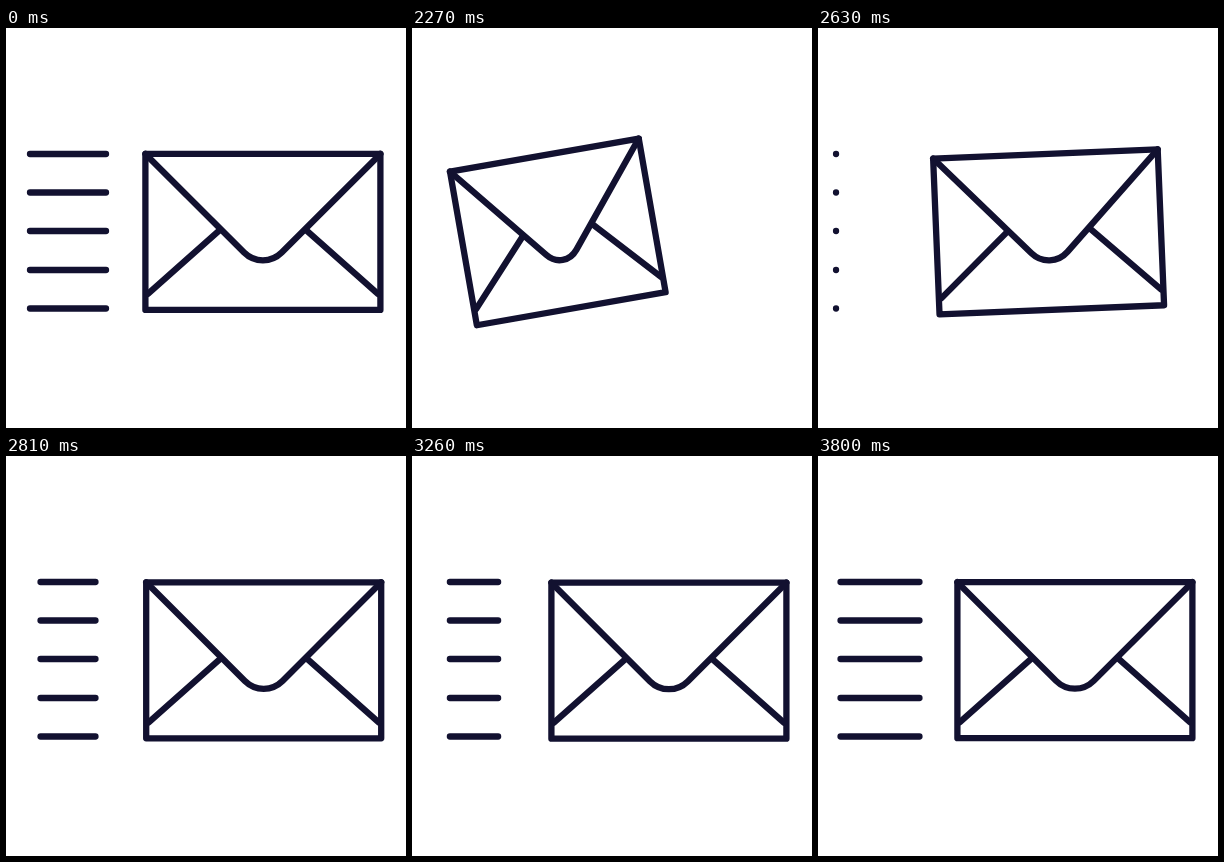
An HTML page for the animation above (3.83 s loop, 400x400 px).

```html
<!DOCTYPE html>
<html lang="en">
<head>
<meta charset="utf-8">
<title>Sending mail</title>
<style>
  html, body { margin: 0; width: 100%; height: 100%; overflow: hidden; background: #fff; }
  svg { display: block; width: 100%; height: 100%; }
  path {
    fill: none; stroke: #121130; stroke-width: 6.3;
    stroke-linecap: round; stroke-linejoin: round;
    vector-effect: non-scaling-stroke;
  }
</style>
</head>
<body>
<svg viewBox="0 0 400 400">
  <path id="trails"/>
  <g id="envelope">
    <path d="M-117.5 -78H117.5V78H-117.5Z"/>
    <path d="M-117.5 -78L-18.8 20.7A26.6 26.6 0 0 0 18.8 20.7L117.5 -78"/>
    <path d="M-43.5 -1.5L-115 62M43.5 -1.5L115 62"/>
  </g>
</svg>
<script>
  const LOOP = 3830, START = 2030, STEP = 30;
  const ROWS = [126, 164.5, 203, 242, 280.5];
  const trails = document.getElementById('trails');
  const envelope = document.getElementById('envelope');

  const clamp = v => Math.min(1, Math.max(0, v));
  const wave = (t, peak, period) => Math.cos(2 * Math.PI * (t - peak) / period);

  // How far the envelope is pulled back: 0 at rest, 1 fully wound up.
  function pull(t) {
    if (t < START) return 0;
    if (t < 2510) return 1 - 0.585 ** ((t - 2000) / STEP);
    return (1 + Math.cos(Math.PI * clamp((t - 2510) / 177))) / 2;
  }

  // Left and right end of the speed lines, or null while they are gone.
  function span(t, p) {
    if (t < 2270) return [24, 24 + 76 * (1 - p)];
    if (t < 2600) return null;
    const left = 26 + 12 * wave(t, 3263, 145);
    const grow = 1 - (1 - clamp((t - 2630) / 120)) ** 2;
    return [left, left + (124 - 2 * left) * grow];
  }

  function draw(t) {
    const p = pull(t);
    const shaking = t > 2690;
    const dx = shaking ? 0.4 + 0.4 * wave(t, 2990, 180) : 0;
    const dy = shaking ? 0.4 + 0.4 * wave(t, 3260, 200) : 0;
    envelope.setAttribute('transform',
      `translate(${256.9 - 112 * p + dx} ${203.9 + dy}) rotate(${-10 * p}) scale(${1 - 0.186 * p} 1)`);

    const ends = span(t, p);
    trails.setAttribute('d', ends
      ? ROWS.map(y => `M${ends[0]} ${y}H${ends[1] + 0.01}`).join('')
      : '');
  }

  const origin = performance.now();
  function tick() {
    const t = Math.max(0, performance.now() - origin) % LOOP;
    draw(t < START ? 0 : START + Math.floor((t - START) / STEP) * STEP);
    requestAnimationFrame(tick);
  }
  tick();
</script>
</body>
</html>
```
